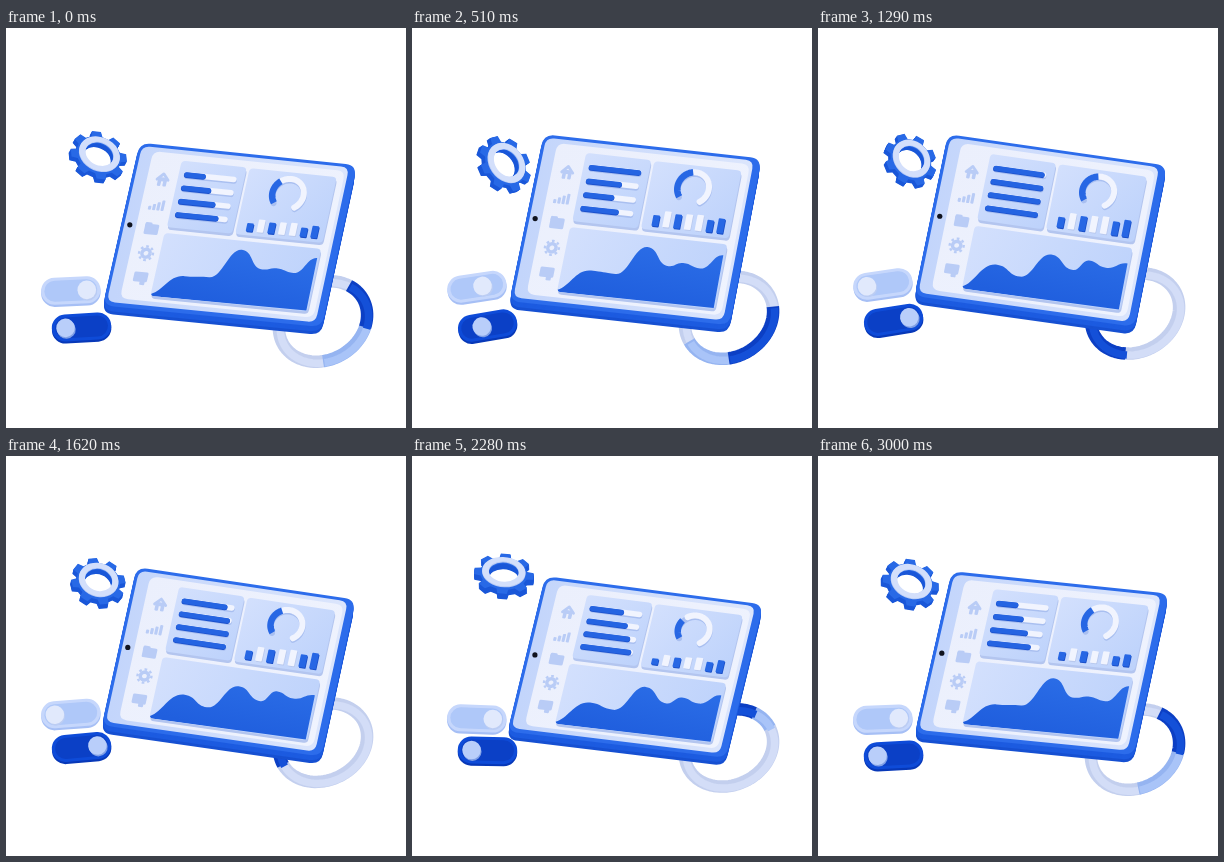
Animation, 400 px wide and 400 px high, one loop 3030 ms. Source, as an HTML page with a canvas:

```html
<!DOCTYPE html>
<html>
<head>
<meta charset="utf-8">
<style>
html, body { margin: 0; width: 100%; height: 100%; overflow: hidden; background: #fff; }
canvas { display: block; }
</style>
</head>
<body>
<canvas id="stage" width="400" height="400"></canvas>
<script>
const c = document.getElementById('stage').getContext('2d');
const LOOP = 3030, TAU = Math.PI * 2, RAD = Math.PI / 180;
let phase = 0, corners;

// One swing per loop, highest at the phase `peak`.
const wave = (mean, amp, peak) => mean + amp * Math.cos(TAU * (phase - peak));

function ease(p, start, span) {
  const u = Math.min(1, Math.max(0, (p - start) / span));
  return u * u * (3 - 2 * u);
}

// Tablet plane (217 x 165) to stage.
function P(x, y) {
  const u = x / 217, v = y / 165, [tl, tr, br, bl] = corners;
  return [0, 1].map(i => (tl[i] * (1 - u) + tr[i] * u) * (1 - v) + (bl[i] * (1 - u) + br[i] * u) * v);
}

function fill(color) { c.fillStyle = color; c.fill(); }
function stroke(color, width) { c.strokeStyle = color; c.lineWidth = width; c.stroke(); }

function box(x, y, w, h, r, color) {
  const X = x + w, Y = y + h;
  const curve = (a, b, d, e) => c.quadraticCurveTo(...P(a, b), ...P(d, e));
  c.beginPath();
  c.moveTo(...P(x + r, y));
  c.lineTo(...P(X - r, y)); curve(X, y, X, y + r);
  c.lineTo(...P(X, Y - r)); curve(X, Y, X - r, Y);
  c.lineTo(...P(x + r, Y)); curve(x, Y, x, Y - r);
  c.lineTo(...P(x, y + r)); curve(x, y, x + r, y);
  c.closePath();
  if (color) fill(color);
}

function line(points, color, width) {
  c.beginPath();
  points.forEach(p => c.lineTo(...P(...p)));
  stroke(color, width);
}

function arc(x, y, r, from, to, color, width) {
  const pts = [];
  for (let k = 0; k <= 40; k++) {
    const a = (from + (to - from) * k / 40) * RAD;
    pts.push([x + r * Math.cos(a), y + r * Math.sin(a)]);
  }
  line(pts, color, width);
}

function ramp(a, b, from, to) {
  const g = c.createLinearGradient(...a, ...b);
  g.addColorStop(0, from);
  g.addColorStop(1, to);
  return g;
}

function card(x, y, w, h) {
  box(x + 1, y + 2.5, w, h, 4, '#b3c5ef');
  box(x, y, w, h, 4, ramp(P(x, y), P(x + w, y + h), '#d3e0fd', '#bdd2fb'));
}

function icons() {
  const tone = '#b9ccf6', X = 30.5;
  c.lineCap = c.lineJoin = 'round';
  line([[X - 5.5, 34.5], [X, 28.5], [X + 5.5, 34.5]], tone, 2.8);
  box(X - 4.5, 33, 3.5, 8, 1, tone);
  box(X + 1, 33, 3.5, 8, 1, tone);
  box(X - 4.5, 32, 9, 4, 1, tone);
  for (let i = 0; i < 4; i++) box(X - 8 + i * 4.2, 61.5 - i * 2.2, 3, 4 + i * 2.2, .8, tone);
  box(X - 7, 78, 7, 5, 1.5, tone);
  box(X - 7, 79.5, 14, 10.5, 1.5, tone);
  c.lineCap = 'butt';
  arc(X, 109, 4, 0, 360, tone, 3.4);
  for (let a = 0; a < 360; a += 45) arc(X, 109, 6.8, a - 11, a + 11, tone, 2.4);
  box(X - 7, 128, 14, 10, 1.5, tone);
  box(X, 136, 5, 5, 1, tone);
}

// Each row grows fast, holds, then drains; rows follow one another.
function lines() {
  c.lineCap = 'round';
  for (let i = 0; i < 4; i++) {
    const y = 27 + i * 13.5, low = .33 + i * .1, hold = .38 + i * .015;
    const p = (phase + .98 - i * .085) % 1;
    const full = p < hold ? ease(p, 0, .15) : (1 - p) / (1 - hold);
    const end = 53 + 47 * (low + (1 - low) * full);
    line([[53.5, y + 1.5], [100.5, y + 1.5]], '#a9bff0', 5.5);
    line([[53, y], [100, y]], '#f1f4fe', 5.5);
    line([[53, y + .6], [end, y + .6]], '#1a50cc', 5.5);
    line([[53, y], [end, y]], '#2564e2', 5);
  }
}

function gauge() {
  c.lineCap = 'round';
  arc(156.5, 37.5, 15.5, 145, 415, '#a9bff0', 6);
  arc(156, 36, 15.5, 235, 415, '#f1f4fe', 6);
  c.lineCap = 'butt';
  arc(156, 36, 15.5, 140, wave(240, 28, .3), '#2767e4', 6.5);
  [9, 14, 12.5, 14, 15, 11.5, 14.5].forEach((mean, i) => {
    const h = wave(mean, 2.7, .3 + i * .02), x = 122.6 + i * 10.7, blue = [0, 2, 5, 6].includes(i);
    box(x + .8, 78 - h, 6.5, h, .8, blue ? '#1a4fc8' : '#b9c9ee');
    box(x, 77 - h, 6.5, h, .8, blue ? '#2767e4' : '#f1f4fe');
  });
}

function area() {
  // Turning points of the curve: x, mean height, sway.
  const pts = [
    [38, 150, 0], [73, 125, -3], [97, 129, 2.5], [123, 100.8, 4.8],
    [147, 115.5, 2], [160.5, 108, -3], [178, 112, -2], [198, 100, 3.5]
  ].map(([x, y, sway]) => [x, wave(y, sway, .52)]);
  c.save();
  box(44, 87, 156, 64, 4);
  c.clip();
  c.beginPath();
  c.moveTo(...P(...pts[0]));
  for (let i = 1; i < pts.length; i++) {
    const [x0, y0] = pts[i - 1], [x1, y1] = pts[i], mid = (x0 + x1) / 2;
    c.bezierCurveTo(...P(mid, y0), ...P(mid, y1), ...P(x1, y1));
  }
  c.lineTo(...P(198.5, 150));
  c.lineTo(...P(44, 151));
  c.closePath();
  fill(ramp(P(100, 95), P(100, 150), '#2a6ce6', '#205fde'));
  c.restore();
}

function tablet() {
  corners = [
    [wave(132, 2.1, .9), wave(112, 8.5, .8)],
    [wave(350, 1.3, .85), wave(139.5, 9.3, .71)],
    [wave(315.8, 2, .25), wave(299.5, 2.5, .72)],
    [wave(96.4, 1, .18), wave(273, 5, .92)]
  ];
  for (let d = 8; d > 0; d--) {
    c.save();
    c.translate(-d * .1, d);
    box(0, 0, 217, 165, 11, d > 5 ? '#1650d2' : '#1c5be0');
    c.restore();
  }
  box(0, 0, 217, 165, 11, '#2c6ceb');
  box(3, 3, 207, 158, 8, ramp(P(0, 80), P(210, 80), '#c3d5fb', '#dbe5fc'));
  box(15, 7, 192, 149.5, 8, ramp(P(15, 10), P(205, 155), '#ebeffc', '#eff3fe'));
  c.beginPath();
  c.arc(...P(8.5, 82.5), 2.6, 0, TAU);
  fill('#10131f');
  icons();
  card(45, 13.5, 65, 67.5);
  card(113, 14, 87, 67);
  card(44, 87, 156, 64);
  lines();
  gauge();
  area();
}

function drawRing() {
  const y = wave(289.8, 4.2, .92), ry = wave(39.7, 1.2, .2), turn = 360 * phase;
  const start = turn + wave(-52, 20, .7), end = turn + wave(33, 20, .48), mid = turn + wave(74, 16, .12);
  const part = (from, to, inner, outer) => {
    [[0, 12.5, inner], [1.5, 7.5, outer]].forEach(([shift, width, color]) => {
      c.beginPath();
      for (let a = from; ; a = Math.min(to, a + 4)) {
        const px = 44 * Math.cos(a * RAD), py = ry * Math.sin(a * RAD);
        c.lineTo(317 + shift + px - py * .08, y + shift + py - px * .08);
        if (a >= to) break;
      }
      stroke(color, width);
    });
  };
  c.lineCap = 'butt';
  c.lineJoin = 'round';
  part(mid - .5, start + 360.5, '#c3cfee', '#d3ddf7');
  part(end - .5, mid, '#95b4f1', '#a9c4f8');
  part(start, end, '#0c3fc4', '#1450d8');
}

function drawGear() {
  const x = wave(93.1, 1.3, .22), y = wave(126.3, 10, .25);
  const a = wave(.945, .09, .79), b = wave(.075, .045, .2), d = wave(.83, .13, .25);
  const ox = wave(-2.2, 2.5, .72), oy = wave(5, 2, .74);
  const spin = wave(-88.5, 5, .72) * RAD - TAU * phase;
  const layer = (depth, color, teeth) => {
    c.save();
    c.transform(a, b, b, d, x + ox * depth, y + oy * depth);
    c.beginPath();
    if (teeth) {
      for (let i = 0; i < 8; i++) {
        const mid = spin + i * TAU / 8;
        [[-.25, 23], [-.16, 29], [.16, 29], [.25, 23]].forEach(([da, r]) =>
          c.lineTo(r * Math.cos(mid + da), r * Math.sin(mid + da)));
      }
      c.closePath();
    } else c.arc(0, 0, 21, 0, TAU);
    c.moveTo(14.5, 0);
    c.arc(0, 0, 14.5, 0, TAU);
    c.fillStyle = color;
    c.fill('evenodd');
    c.restore();
  };
  for (let k = 1; k > .25; k -= .1) layer(k, '#1a57d8', true);
  layer(.2, '#2869e6', true);
  layer(.05, '#b4c8f4');
  layer(-.1, '#d3dffb');
}

function toggle(x, y, angle, pos, [side, top, well, knob, edge]) {
  const pill = (w, h, dy, color) => {
    c.beginPath();
    c.roundRect(-w / 2, dy - h / 2, w, h, h / 2);
    fill(color);
  };
  const disc = (dx, dy, color) => {
    c.beginPath();
    c.arc(pos + dx, dy, 9.3, 0, TAU);
    fill(color);
  };
  c.save();
  c.translate(x, y);
  c.rotate(angle * RAD);
  pill(59.5, 27, 2.2, side);
  pill(59.5, 27, 0, top);
  pill(53, 21, 0, well);
  disc(.8, 1.6, edge);
  disc(0, 0, knob);
  c.restore();
}

function toggles() {
  const pos = 16 * (1 - 2 * ease(phase, .119, .132) + 2 * ease(phase, .599, .132));
  const tilt = wave(-4, 6.3, .79);
  toggle(64.8, wave(259.7, 3.9, .88), tilt, pos, ['#a6bff5', '#c6d7fc', '#afc8f9', '#e1e9fc', '#bccdf3']);
  toggle(75.5, wave(295, 4, .03), tilt - 1, -pos, ['#0738b8', '#0e4bd8', '#0b40c6', '#b9cefa', '#7f9fe6']);
}

function frame() {
  phase = performance.now() % LOOP / LOOP;
  c.fillStyle = '#fff';
  c.fillRect(0, 0, 400, 400);
  drawRing();
  tablet();
  drawGear();
  toggles();
  requestAnimationFrame(frame);
}
frame();
</script>
</body>
</html>
```
